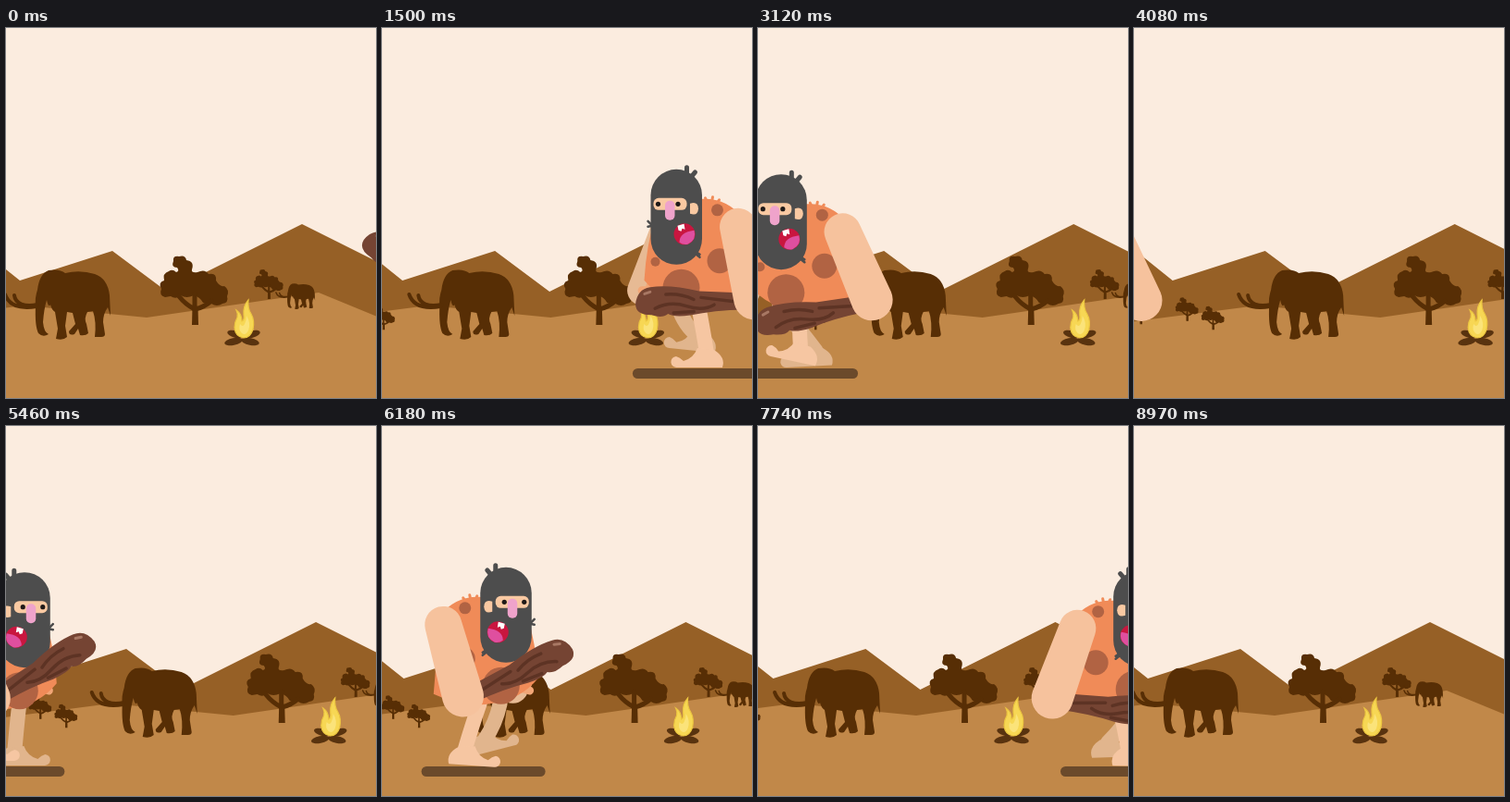
Recreate the animation shown at these times as an HTML page. Size 400 by 400 pixels, loop 9000 ms.

```html
<!DOCTYPE html>
<html lang="en">
<head>
<meta charset="utf-8">
<title>Caveman walk</title>
<style>
  html, body { margin: 0; width: 100%; height: 100%; overflow: hidden; background: #fbecdf; }
  svg { display: block; width: 100vw; height: 100vh; }
</style>
</head>
<body>
<svg viewBox="0 0 400 400">
  <defs>
    <g id="mammoth" fill="#572e05">
      <path d="M46 262Q58 260 64 265Q80 261 96 266Q110 271 112 289L113 311L110 302Q105 309 105 318L107 331Q107 334 103 334H96Q98 318 94 306L88 307Q84 314 87 320L89 330Q86 333 80 332L78 325L74 331Q68 333 68 328L75 320L72 308L66 307L64 322L66 334Q62 338 54 336L56 325L53 307Q49 304 48 299Q46 303 44 294Q41 304 40 318Q41 329 46 331Q40 335 35 330Q31 322 32 300Q31 292 34 283Q36 266 46 262Z"/>
      <path d="M33 301C14 304 3 300 -1 288M34 299C20 302 10 298 9 289" fill="none" stroke="#572e05" stroke-width="4" stroke-linecap="round"/>
    </g>
    <g id="tree" fill="#572e05">
      <path d="M181 252Q180 246 187 247Q194 245 195 251Q204 252 201 261Q200 265 207 264Q215 260 219 266Q228 264 227 273Q231 280 236 279Q242 283 239 290Q241 297 234 298Q228 302 222 298L213 297Q210 291 203 289Q195 293 189 289Q184 294 178 290L172 291Q165 289 168 282Q164 275 171 273Q169 265 176 263Q180 260 184 264Q188 263 185 259Q178 259 181 252Z"/>
      <path d="M204.500 318V303M204 304Q194 299 187 290M204.500 304Q214 302 222 295M204 302V287" fill="none" stroke="#572e05" stroke-width="5" stroke-linecap="round"/>
      <path d="M201.500 302H207.500L208 321H201Z"/>
    </g>
  </defs>

  <rect width="400" height="400" fill="#fbecdf"/>
  <path id="hills" fill="#966026" d="M-70 205L15 273L115 241L174 285L320 212L460 282V400H-70Z"/>
  <g id="land">
    <path fill="#c18849" d="M-150 322L20 300L152 313L338 286L430 324V402H-150Z"/>
    <use href="#tree" transform="translate(-176 211) scale(.34)"/>
    <use href="#tree" transform="translate(-126 207.500) scale(.34)"/>
    <use href="#tree" transform="translate(-98 217) scale(.34)"/>
    <use href="#tree" transform="translate(196.500 155) scale(.43)"/>
    <use href="#tree"/>
    <use href="#mammoth"/>
    <use href="#mammoth" transform="translate(292.300 179.500) scale(.37)"/>
    <g fill="#59330f">
      <ellipse cx="248" cy="331" rx="9" ry="3.800" transform="rotate(14 248 331)"/>
      <ellipse cx="266" cy="331" rx="9" ry="3.800" transform="rotate(-14 266 331)"/>
      <ellipse cx="246" cy="339" rx="10" ry="3.800" transform="rotate(-12 246 339)"/>
      <ellipse cx="264" cy="339" rx="10" ry="3.800" transform="rotate(12 264 339)"/>
    </g>
    <path fill="#f7d754" stroke="#ecc640" stroke-width="1.200" d="M262 294Q261 303 265 309Q269 316 267 326Q264 335 257 335Q248 334 247 324Q247 318 250 313Q251 309 249 305Q255 309 255 317Q258 316 257 310Q256 301 262 294Z"/>
    <path fill="#fbe37a" d="M260 311Q265 319 262 327Q259 333 255 330Q251 326 253 320Q256 324 258 320Q260 316 260 311Z"/>
  </g>

  <g id="man" stroke-linecap="round" stroke-linejoin="round">
    <rect y="368" width="134" height="11" rx="5.500" fill="#6b4a2b"/>
    <g id="farLeg" fill="#e1b58d" stroke="#e1b58d"></g>
    <path id="farArm" fill="none" stroke="#e7ba94" stroke-width="32"/>
    <path id="farHand" fill="none" stroke="#f2a676" stroke-width="9"/>
    <g id="nearLeg" fill="#f6c6a2" stroke="#f6c6a2"></g>
    <g id="body">
      <path fill="#f08b58" d="M24 200L74 185Q100 184 117 205L124 290Q90 306 60 300Q30 296 11 273Q13 236 24 200Z"/>
      <path d="M79 188L77 184M84 188L85 183M89 190L92 186" stroke="#f08b58" stroke-width="3"/>
      <g fill="#b16343">
        <circle cx="92.500" cy="252" r="13.500"/><circle cx="51" cy="281" r="20"/>
        <circle cx="90" cy="197" r="6.500"/><circle cx="23" cy="253" r="5"/>
      </g>
      <g stroke="#4d4d4d" fill="none">
        <path d="M57 162V151M61 162L66 156" stroke-width="5"/>
        <path d="M15 209L20 214M15 215L20 214M66 244L71 248M68 243L71 245" stroke-width="2.500"/>
      </g>
      <rect x="18" y="153" width="55.500" height="103" rx="27.700" fill="#4d4d4d"/>
      <rect x="21" y="184" width="36" height="13" rx="5.500" fill="#f9c9a2"/>
      <path fill="#f9c9a2" d="M60.500 190Q69 187 69.500 195.500Q69 204 60.500 201Z"/>
      <circle cx="26" cy="190.500" r="2.600" fill="#201a18"/>
      <circle cx="47.500" cy="190.500" r="2.600" fill="#201a18"/>
      <rect x="33.500" y="187" width="10.500" height="21" rx="5" fill="#efa3cb"/>
      <circle cx="54.500" cy="223" r="11.500" fill="#c9163f"/>
      <path d="M49 232Q49 221 65 219Q68 229 58 234Q53 235 49 232Z" fill="#df4f9f"/>
      <path d="M47 214L54 212L55 218L52 217L51 220L48 219Z" fill="#fff"/>
      <g id="club">
        <path fill="#754433" d="M-129 2Q-127 -14 -113 -16Q-92 -19 -60 -11L-10 -8V10Q-45 10 -70 15Q-88 17 -94 13Q-100 18 -112 14Q-129 14 -129 2Z"/>
        <path d="M-108 7Q-92 -1 -74 5T-44 4M-96 -8Q-80 -9 -66 -2M-58 -4L-22 1M-88 12L-66 11" fill="none" stroke="#5d3324" stroke-width="3.500"/>
        <path d="M-119 -9L-113 -11" stroke="#a87864" stroke-width="3"/>
      </g>
      <path id="nearArm" fill="#f6c29d" d="M93 215A20 20 0 0 1 133 215L135.500 295A22.500 22.500 0 0 1 90.500 295Z"/>
    </g>
  </g>
</svg>
<script>
const LOOP = 9000, HALF = LOOP / 2, STEP = 900;
const el = Object.fromEntries([...document.querySelectorAll("[id]")].map(e => [e.id, e]));
const set = (node, name, value) => node.setAttribute(name, value);
const wave = (t, peak, period = STEP) => Math.cos(2 * Math.PI * (t - peak) / period);

// Ease with flat ends; x1 and x2 are the handle positions in time.
function ease(u, x1 = 1 / 3, x2 = 2 / 3) {
  let lo = 0, hi = 1;
  for (let i = 0; i < 24; i++) {
    const s = (lo + hi) / 2, r = 1 - s;
    if (3 * r * r * s * x1 + 3 * r * s * s * x2 + s * s * s < u) lo = s; else hi = s;
  }
  return lo * lo * (3 - 2 * lo);
}

// Step poses: phase, toe x, lift, toe tilt in degrees.
const GAIT = [
  [60, 49, 5, 0], [150, 34, 17, 6], [300, 26, 14, 14],
  [420, 34, 4, 12], [510, 16, 0, 0], [600, 42, 0, 0], [780, 49, 1, -4]
];

function gait(t) {
  const n = GAIT.length;
  const at = i => {
    const k = (i + n) % n, turns = Math.floor(i / n);
    return [GAIT[k][0] + turns * STEP, ...GAIT[k].slice(1)];
  };
  let p = ((t % STEP) + STEP) % STEP;
  if (p < GAIT[0][0]) p += STEP;
  let i = 0;
  while (at(i + 1)[0] <= p) i++;
  const [a, b, c, d] = [-1, 0, 1, 2].map(k => at(i + k));
  const span = c[0] - b[0], u = (p - b[0]) / span, v = 1 - u;
  return [1, 2, 3].map(k => {
    const m0 = (c[k] - a[k]) / (c[0] - a[0]) * span;
    const m1 = (d[k] - b[k]) / (d[0] - b[0]) * span;
    return b[k] * v * v * (1 + 2 * u) + m0 * u * v * v + c[k] * u * u * (3 - 2 * u) - m1 * u * u * v;
  });
}

for (const leg of [el.nearLeg, el.farLeg]) {
  leg.innerHTML = `<path fill="none" stroke-width="16"/>
    <path stroke="none" d="M5 355Q9 356 13 360Q24 357 28 346L46 348Q59 356 55 367H6A6 6 0 0 1 5 355Z"/>`;
}

function drawLeg(leg, hip, t) {
  const [toe, lift, tilt] = gait(t), ankle = toe + 38, y = 351 - lift;
  const kneeX = (hip + ankle) / 2 - lift * 0.3;
  set(leg.children[0], "d", `M${hip} 300Q${kneeX} 322 ${ankle} ${y}`);
  set(leg.children[1], "transform", `translate(${toe} ${-lift}) rotate(${tilt} 44 362)`);
}

function drawMan(t) {
  const back = t >= HALF, travel = 575 * ease((t % HALF) / HALF);
  set(el.man, "transform", back ? `translate(${-4 + travel} 0) scale(-1 1)` : `translate(${420 - travel} 0)`);

  const sway = 4.5 * wave(t, 400) + 0.8, bob = 1.3 + 4.8 * wave(t, 15, STEP / 2);
  set(el.body, "transform", `translate(${sway} ${bob})`);

  const swing = 24 * wave(t, 455), rad = swing * Math.PI / 180;
  set(el.nearArm, "transform", `rotate(${-swing} 113 217)`);
  const elbow = [113 + 79.5 * Math.sin(rad), 217 + 79.5 * Math.cos(rad)];
  set(el.club, "transform", `translate(${elbow}) rotate(${10 + 22 * wave(t, 0)})`);

  const farX = 28 + 22 * wave(t, 60), farY = 284 + bob;
  set(el.farArm, "d", `M${35 + sway} ${215 + bob}L${farX} ${farY}`);
  set(el.farHand, "d", `M${farX} ${farY}L24 284L17 286M24 284L19 279`);

  drawLeg(el.nearLeg, 71, t);
  drawLeg(el.farLeg, 49, t + STEP / 2);
}

function draw(t) {
  const u = (t % HALF) / HALF, back = t >= HALF;
  const land = back ? 1 - ease(u, 1 / 6, 2 / 3) : ease(u);
  const hills = back ? 1 - ease(u, 0.07, 0.24) : ease(u);
  set(el.land, "transform", `translate(${117 * land} 0)`);
  set(el.hills, "transform", `translate(${27.4 * hills} 0)`);
  drawMan(t);
}

const start = performance.now();
function tick() {
  const t = (performance.now() - start) % LOOP;
  draw(Math.floor(t / 30) * 30);
  requestAnimationFrame(tick);
}
tick();
</script>
</body>
</html>
```
